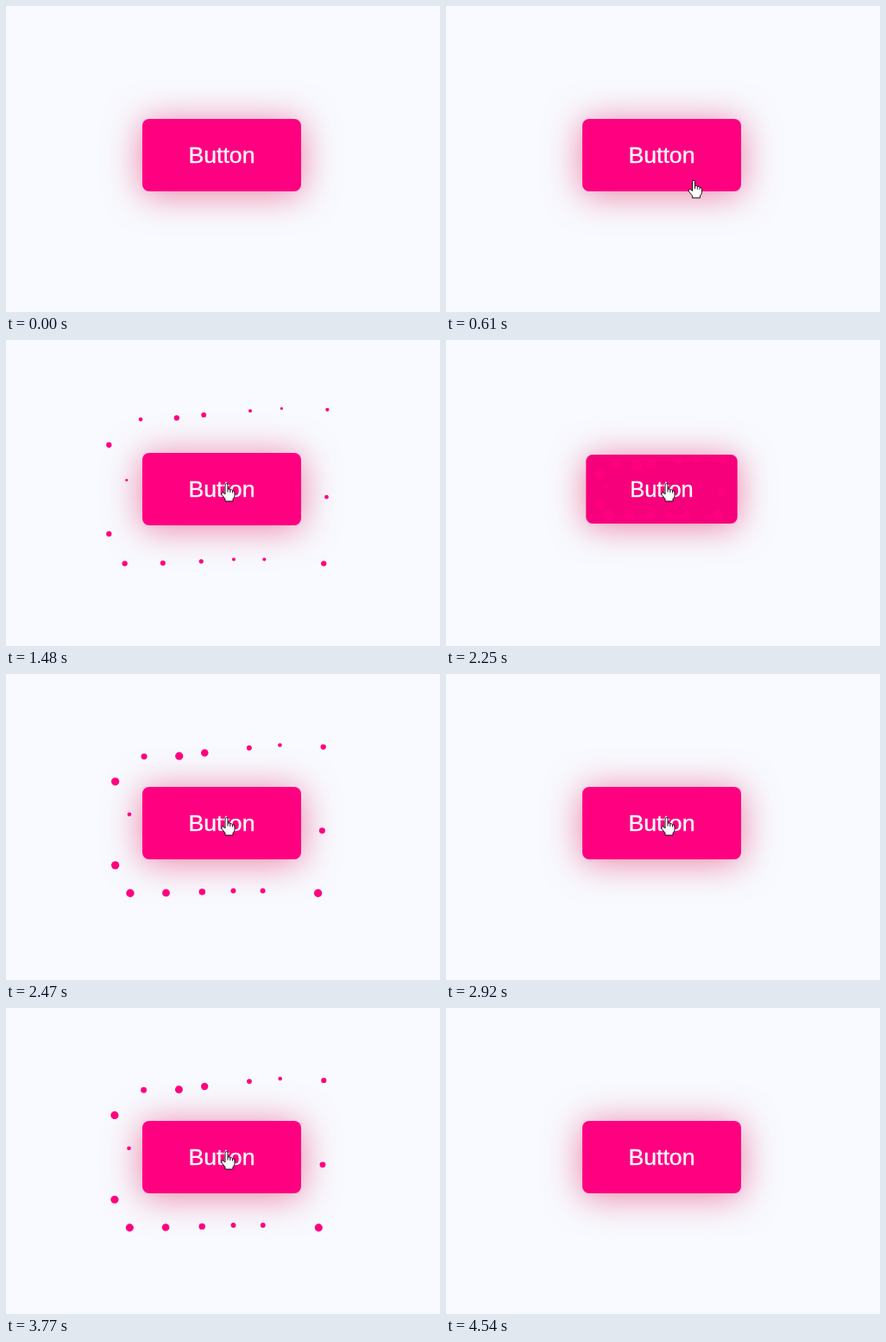
An HTML page for the animation above (5150 ms loop, 503 by 355 pixels).

```html
<!DOCTYPE html>
<html lang="en">
<head>
<meta charset="utf-8">
<title>Bubbly button</title>
<style>
  html, body { margin: 0; width: 100%; height: 100%; overflow: hidden; background: #f8faff; }
  .stage { position: relative; width: 503px; height: 355px; overflow: hidden; }
  .button {
    position: absolute; left: 158px; top: 131px; width: 184px; height: 84px;
    border-radius: 8px;
    font: 26.67px/84px "Liberation Sans", Arial, sans-serif;
    -webkit-text-stroke: .35px #fff;
    text-align: center; color: #fff; background: #ff0081;
    box-shadow: 0 3.33px 41.67px rgba(230, 0, 70, .5);
  }
  .bubbles {
    position: absolute; left: -53.33px; top: -53.33px;
    width: 290.67px; height: 190.67px; overflow: hidden; fill: #ff0081;
  }
  .pointer { position: absolute; left: 0; top: 0; width: 503px; height: 355px; }
  .pointer path { fill: #fff; stroke: #000; stroke-width: .9; stroke-linejoin: round; }
</style>
</head>
<body>
<div class="stage">
  <div class="button" id="button">Button<svg class="bubbles" id="bubbles"></svg></div>
  <svg class="pointer">
    <g id="hand">
      <path d="M-1.5 1.5Q-1.5 0 0 0T1.5 1.5V6.5Q4 6 4.3 7.3Q6.5 6.8 7 8.2Q9.5 8 9.5 10.5V14Q9.5 16 7.5 18V20.5H-1.5V18L-5.5 13Q-6.5 10.5-4.5 10.3Q-3 10.5-1.5 12.5Z"/>
      <path d="M1.5 6.5V10M4.3 7.3V10.5M7 8.2V11" fill="none"/>
    </g>
    <path id="arrow" d="M0 0V16.5L3.8 13L6.4 18.8L8.8 17.8L6.3 12H11.5Z"/>
  </svg>
</div>
<script>
const LOOP = 5150, STEP = 76;
const W = 290.67, H = 190.67;
const SCALE_MS = 190, SPREAD_MS = 220, SHRINK_MS = 600;
const CLICKS = [{ down: 990, up: 1177 }, { down: 2080, up: 2262 }, { down: 3290, up: 3548 }];
const REST = { x: 255.5, y: 166.5 };

const $ = id => document.getElementById(id);
const clamp = x => Math.min(1, Math.max(0, x));
const ease = x => (x = clamp(x), x * x * (3 - 2 * x));
const mix = (a, b, k) => a + (b - a) * k;
const stepped = (t, anchor) => anchor + Math.floor((t - anchor + 2) / STEP) * STEP;

// Each edge of the ring follows its own rule; positions and tile sizes are fractions of the box.
const topEdge = [.15, .30, .42, .62, .75, .95].map((x, i) =>
  ({ x, y: .06 * (1 - i / 5) ** 2 - .02, tile: .15 + .05 * Math.sin(1.2 * i) }));
const bottomEdge = [.07, .24, .41, .55, .68, .95].map((x, i) => {
  const lift = Math.sin(Math.PI * (i / 5) ** 2);
  return { x, y: 1 - .05 * lift, tile: .2 - .08 * lift };
});
const leftEdge = [.20, .44, .80].map((y, i) => {
  const inset = .1 * Math.sin(Math.PI * i / 2);
  return { x: inset, y, tile: .2 - inset };
});
const ring = [...topEdge, ...bottomEdge, ...leftEdge, { x: .95, y: .55, tile: .15 }];

for (const bubble of ring) {
  bubble.dot = document.createElementNS("http://www.w3.org/2000/svg", "circle");
  $("bubbles").append(bubble.dot);
}

// Bubbles start pulled in behind the button's edge, then spread to the ring and shrink.
function drawBubbles(spread, size) {
  for (const { x, y, tile, dot } of ring) {
    const s = tile * size;
    const place = (end, pull) => mix(mix(.5, end, pull), end, spread) * (1 - s) + s / 2;
    dot.setAttribute("cx", place(x, .65) * W);
    dot.setAttribute("cy", place(y, .4) * H);
    dot.setAttribute("r", size < .03 ? 0 : .092 * s * Math.hypot(W, H));
  }
}

function drawButton(now) {
  const click = CLICKS.filter(c => c.down <= now).pop();
  let press = 0, spread = 1, size = 0;
  if (click) {
    const t = Math.max(click.down, stepped(now, 36));
    press = ease((t - click.down) / SCALE_MS) * (1 - ease((t - click.up) / SCALE_MS));
    spread = ease((t - click.up) / SPREAD_MS);
    size = 1 - ease((t - click.up) / SHRINK_MS);
  }
  $("button").style.transform = press ? `scale(${1 - .05 * press})` : "none";
  $("button").style.backgroundColor = `rgb(${255 - 9 * press}, 0, ${129 - 6 * press})`;
  drawBubbles(spread, size);
}

function drawPointer(now) {
  let { x, y } = REST;
  if (now < 690) {
    const k = 1 - (1 - clamp((stepped(now, 310) - 310) / 380)) ** 1.7;
    x = mix(405, x, k);
    y = mix(336, y, k);
  } else if (now >= 4240) {
    const k = clamp((stepped(now, 4240) - 4165) / 375) ** 1.5;
    x = mix(x, 532, k);
    y = mix(y, 400, k);
  }
  const visible = now >= 310 && now < 4540;
  const over = x > 158 && x < 342 && y > 131 && y < 215;
  for (const [id, shown] of [["hand", visible && over], ["arrow", visible && !over]]) {
    $(id).setAttribute("transform", `translate(${x} ${y})`);
    $(id).style.display = shown ? "" : "none";
  }
}

const start = performance.now();
function frame() {
  const now = (performance.now() - start) % LOOP;
  drawButton(now);
  drawPointer(now);
  requestAnimationFrame(frame);
}
frame();
</script>
</body>
</html>
```
